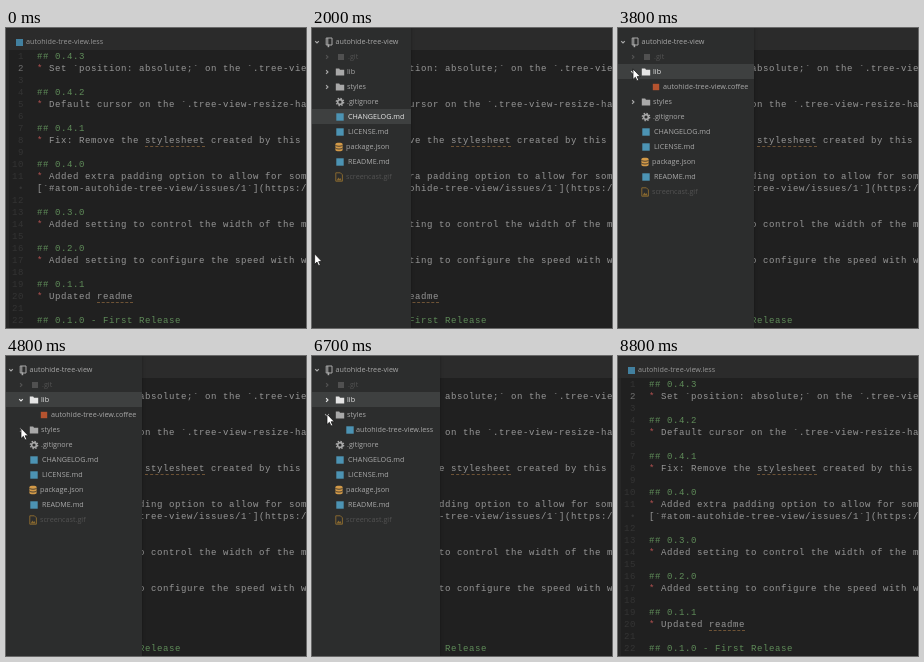
Write an HTML page that moves like this. It is 300x300 px and loops after 9000 ms.

```html
<!DOCTYPE html>
<html lang="en">
<head>
<meta charset="utf-8">
<title>Autohide tree view</title>
<style>
  html, body { margin: 0; width: 100%; height: 100%; overflow: hidden; background: #202020; }
  #stage { position: relative; width: 300px; height: 300px; overflow: hidden; background: #202020;
    font: 7.2px/15px "Open Sans", sans-serif; color: #a8a8a8; }
  #stage * { box-sizing: border-box; }
  #tab { position: absolute; inset: 0 0 auto; height: 22px; background: #2b2b2b; color: #979797; }
  #tab i { position: absolute; left: 10px; top: 11px; width: 7px; height: 7px; background: #42809f; }
  #tab span { position: absolute; left: 20px; top: 6px; }
  #edge { position: absolute; left: 0; top: 22px; width: 3px; bottom: 0; background: #272727; }
  #code { position: absolute; left: 0; top: 23px; font: 9px/12px "Liberation Mono", monospace;
    letter-spacing: .6px; color: #979797; }
  .line { position: relative; height: 12px; padding-left: 31px; white-space: pre; }
  .line b { position: absolute; left: 0; width: 18px; text-align: right; font-weight: normal; color: #343434; }
  .line b.now { color: #707070; }
  .head { color: #5f8c59; }
  .star { color: #b0504f; }
  u { text-decoration: none; border-bottom: 1px dashed #6e5336; }
  #panel { position: absolute; left: 0; top: 0; height: 300px; overflow: hidden;
    background: #2c2d2d; box-shadow: 0 0 3px rgba(0, 0, 0, .35); }
  #tree { padding-top: 6px; }
  .row { position: relative; height: 15px; white-space: pre; }
  .row.on { background: #3e4040; color: #e4e4e4; }
  .row.dim { color: #525252; }
  .row span { position: absolute; top: 0; }
  .row svg { position: absolute; top: 3px; width: 10px; height: 10px; overflow: visible; }
  .mouse { position: absolute; left: 0; top: 0; overflow: visible; }
</style>
</head>
<body>
<div id="stage">
  <div id="tab"><i></i><span>autohide-tree-view.less</span></div>
  <div id="code"></div>
  <div id="edge"></div>
  <div id="panel"><div id="tree"></div></div>
  <svg class="mouse" id="arrow" width="9" height="13">
    <path d="M0 0V10.5L2.4 8.3 4 12 5.7 11.2 4.1 7.7H7.3Z" fill="#fff" stroke="#111" stroke-width=".7"/>
  </svg>
  <svg class="mouse" id="beam" width="1" height="1" fill="none">
    <defs><path id="bar" d="M-2-4.5H-1L0-4 1-4.5H2M0-4V4M-2 4.5H-1L0 4 1 4.5H2"/></defs>
    <use href="#bar" stroke="#111" stroke-width="2"/>
    <use href="#bar" stroke="#eee"/>
  </svg>
</div>
<script>
const LOOP = 9000, TICK = 100;
const $ = id => document.getElementById(id);

// Editor: empty strings are blank lines, "[" marks a soft-wrapped line.
const text = `## 0.4.3
* Set \`position: absolute;\` on the \`.tree-view\`

## 0.4.2
* Default cursor on the \`.tree-view-resize-handle\`

## 0.4.1
* Fix: Remove the <u>stylesheet</u> created by this package

## 0.4.0
* Added extra padding option to allow for some
[\`#atom-autohide-tree-view/issues/1\`](https://

## 0.3.0
* Added setting to control the width of the mouse

## 0.2.0
* Added setting to configure the speed with which

## 0.1.1
* Updated <u>readme</u>

## 0.1.0 - First Release`;

let number = 0;
$('code').innerHTML = text.split('\n').map(s => {
  const label = s[0] === '[' ? '•' : ++number;
  const body = s[0] === '#' ? `<span class="head">${s}</span>` : s.replace(/^\*/, '<span class="star">*</span>');
  return `<div class="line"><b class="${label === 2 ? 'now' : ''}">${label}</b>${body}</div>`;
}).join('');

// Icons live in a 10 x 10 box.
const square = (color, size = 7.4) =>
  `<rect x="${5 - size / 2}" y="${5 - size / 2}" width="${size}" height="${size}" fill="${color}"/>`;
const stroke = (d, w = 1) => `<path d="${d}" fill="none" stroke="currentColor" stroke-width="${w}"/>`;
const icons = {
  open: stroke('M3.2 4.1 5 5.9 6.8 4.1', 1.2),
  shut: stroke('M4.1 3.2 5.9 5 4.1 6.8', 1.2),
  repo: stroke('M2.2 1H8V8H2.2ZM3.8 1V8') + stroke('M4.4 7.5V10.2', 1.6),
  folder: '<path d="M.8 1.6H4.2L5 2.7H9.2V8.6H.8Z" fill="currentColor"/>',
  gear: '<circle cx="5" cy="5" r="2.4" fill="none" stroke="currentColor" stroke-width="1.7"/>' +
    '<circle cx="5" cy="5" r="3.7" fill="none" stroke="currentColor" stroke-width="1.3" stroke-dasharray="1.45 1.456"/>',
  data: '<path d="M1.4 2.2C1.4.4 8.6.4 8.6 2.2V7.9C8.6 9.7 1.4 9.7 1.4 7.9Z" fill="#d39a48"/>' +
    '<path d="M1.4 3.2C2.4 4.6 7.6 4.6 8.6 3.2M1.4 6C2.4 7.4 7.6 7.4 8.6 6" fill="none" stroke="#2c2d2d" stroke-width=".8"/>',
  image: '<path d="M1.8.8H6.4L8.4 2.8V9.2H1.8Z" fill="none" stroke="#86672f"/>' +
    '<path d="M2.6 8.4 4.4 5.4 5.6 7 6.4 6 7.7 8.4Z" fill="#86672f"/>',
  git: square('#505050', 6),
  blue: square('#4c93b3'),
  red: square('#b5532f', 6.4)
};

// name, text x, icon, icon centre x, folder arrow centre x, dimmed
const rows = [
  ['autohide-tree-view', 23.5, 'repo', 16.5, 5],
  ['.git', 36, 'git', 28.5, 15, true],
  ['lib', 35, 'folder', 27.5, 15],
  ['autohide-tree-view.coffee', 45, 'red', 38],
  ['styles', 35, 'folder', 27.5, 15],
  ['autohide-tree-view.less', 44, 'blue', 38],
  ['.gitignore', 35, 'gear', 27.5],
  ['CHANGELOG.md', 36, 'blue', 28],
  ['LICENSE.md', 36, 'blue', 28],
  ['package.json', 34, 'data', 27],
  ['README.md', 36, 'blue', 28],
  ['screencast.gif', 34, 'image', 27, 0, true]
];
const icon = (name, x, cls = '') => `<svg class="${cls}" style="left:${x - 5}px">${icons[name]}</svg>`;
$('tree').innerHTML = rows.map(([name, x, pic, picX, foldX, dim]) =>
  `<div class="row${dim ? ' dim' : ''}">${foldX ? icon(foldX < 10 ? 'open' : 'shut', foldX, 'fold') : ''}` +
  `${icon(pic, picX)}<span style="left:${x}px">${name}</span></div>`).join('');
const row = Object.fromEntries([...$('tree').children].map((el, i) => [rows[i][0], el]));

// Tracks: time followed by values, eased between neighbours.
const mouse = [[700, 308, 235], [1200, -1, 280], [1600, -1, 280], [2900, 15, 40], [3700, 15, 40],
  [4700, 15, 72], [5300, 15, 72], [5900, 15, 42], [6200, 15, 42], [6600, 15, 58], [7100, 15, 58],
  [8000, 173, 147], [8100, 173, 147], [8500, 308, 112]];
const width = [[3300, 99], [3500, 136], [6100, 136], [6300, 128], [6900, 128], [7100, 99]];
const shown = [[1100, 0], [1300, 1], [8400, 1], [8600, 0]];
const fade = [[1200, 0], [1600, 1], [8200, 1], [8500, 0]];
const picked = [[0, 'CHANGELOG.md'], [3300, 'lib'], [5000, 'styles'], [6100, 'lib'], [6900, 'styles']];

function at(track, t) {
  const i = track.findIndex(k => k[0] > t);
  if (i < 1) return (i ? track[track.length - 1] : track[0]).slice(1);
  const a = track[i - 1], b = track[i];
  const p = (t - a[0]) / (b[0] - a[0]), e = p * p * (3 - 2 * p);
  return a.slice(1).map((v, n) => v + (b[n + 1] - v) * e);
}

function setFolder(name, child, open) {
  row[child].style.display = open ? '' : 'none';
  row[name].querySelector('.fold').innerHTML = icons[open ? 'open' : 'shut'];
}

function draw(t) {
  const [x, y] = at(mouse, t), [w] = at(width, t), [s] = at(shown, t);
  $('panel').style.width = w + 'px';
  $('panel').style.transform = `translateX(${(s - 1) * (w + 4)}px)`;
  $('tree').style.opacity = at(fade, t)[0];

  const current = picked.filter(k => k[0] <= t).pop()[1];
  for (const name in row) row[name].classList.toggle('on', name === current);
  setFolder('lib', 'autohide-tree-view.coffee', t >= 3300 && t < 6100);
  setFolder('styles', 'autohide-tree-view.less', t >= 5000 && t < 6900);

  const overText = x > Math.max(4, w * s) && y > 22;
  for (const id of ['arrow', 'beam']) {
    $(id).style.display = (id === 'beam') === overText ? '' : 'none';
    $(id).style.transform = `translate(${x}px, ${y}px)`;
  }
}

const start = performance.now();
let last = -1;
function frame() {
  const t = Math.floor((performance.now() - start) % LOOP / TICK) * TICK;
  if (t !== last) draw(last = t);
  requestAnimationFrame(frame);
}
frame();
</script>
</body>
</html>
```
